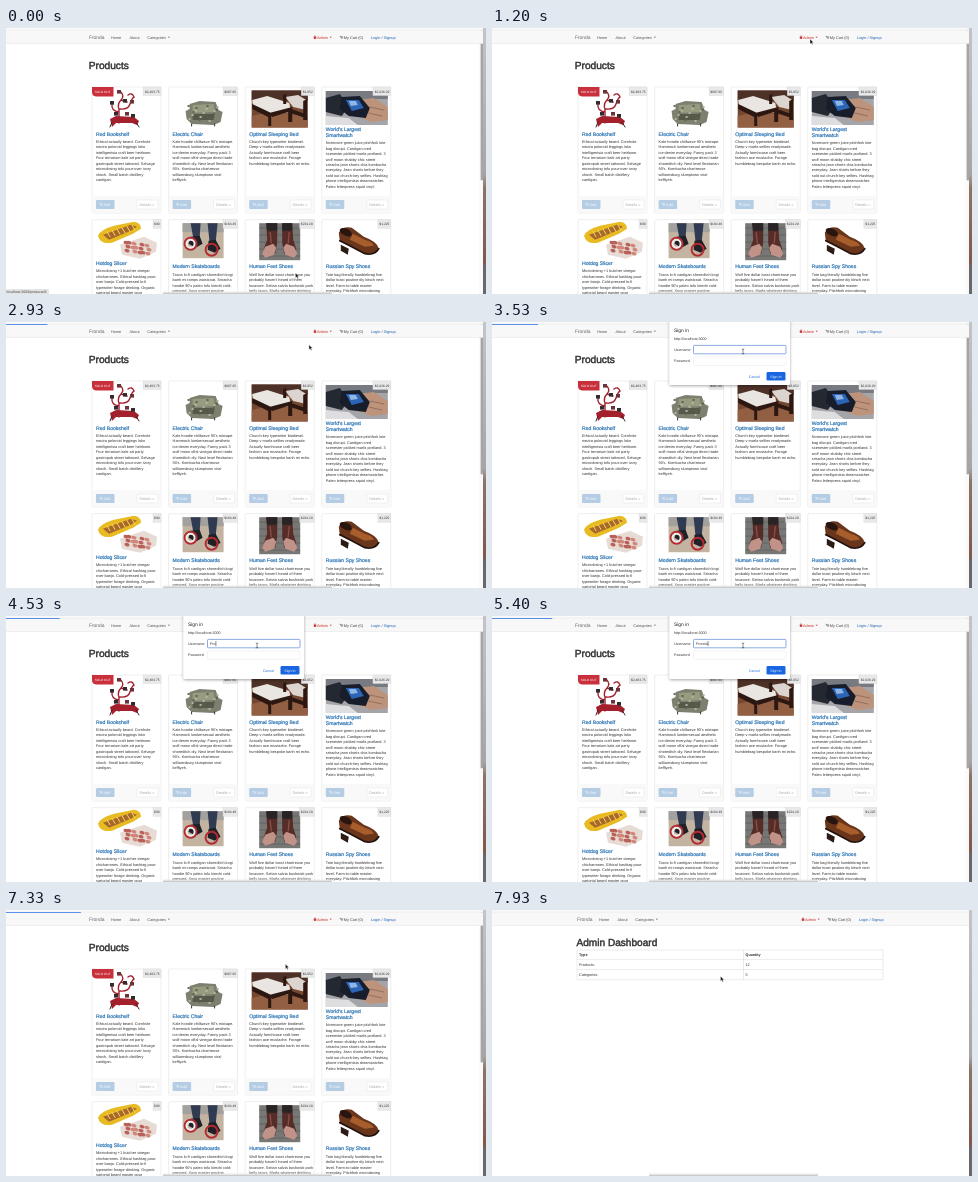
An HTML page that plays this animation: 480 by 266 pixels, repeating every 8 s.

```html
<!DOCTYPE html>
<html lang="en">
<head>
<meta charset="utf-8">
<title>Shop admin sign-in</title>
<style>
  html, body { margin: 0; width: 100%; height: 100%; overflow: hidden; background: #fff; }
  svg { display: block; width: 480px; height: 266px; }
  text { font-family: "Liberation Sans", Arial, sans-serif; text-rendering: geometricPrecision; white-space: pre; }
</style>
</head>
<body>
<svg id="stage" viewBox="0 0 480 266" xmlns="http://www.w3.org/2000/svg"></svg>
<script>
const LOOP = 8000, SHOP = 'Fronda', BODY = 3.85, LEADING = 5.44;
const BLUE = '#337ab7', RED = '#c9302c';

const text = (x, y, str, size = BODY, fill = '#333', extra = '') =>
  `<text x="${x}" y="${y}" font-size="${size}" fill="${fill}" ${extra}>${str}</text>`;
const medium = (x, y, str, size, fill) => text(x, y, str, size, fill, `stroke="${fill}" stroke-width="${size * .045}"`);
const rect = (x, y, w, h, fill, extra = '') =>
  `<rect x="${x}" y="${y}" width="${w}" height="${h}" fill="${fill}" ${extra}/>`;
const path = (d, fill, extra = '') => `<path d="${d}" fill="${fill}" ${extra}/>`;
const line = (d, stroke, width) => path(d, 'none', `stroke="${stroke}" stroke-width="${width}" stroke-linecap="round"`);
const oval = (x, y, rx, ry, fill, turn = 0) =>
  `<ellipse cx="${x}" cy="${y}" rx="${rx}" ry="${ry}" fill="${fill}" transform="rotate(${turn} ${x} ${y})"/>`;
const group = (id, content, extra = '') => `<g id="${id}" ${extra}>${content}</g>`;
const repeat = (count, make) => Array.from({ length: count }, (_, i) => make(i)).join('');
const caretDown = (x, y, fill) => path(`M${x} ${y}h2.2l-1.1 1.3z`, fill);
const cart = (x, y, color) => line(`M${x} ${y}h.5l.5 1.6h1.5l.3-1.1h-2.1`, color, .45) +
  oval(x + 1.2, y + 2.4, .3, .3, color) + oval(x + 2.3, y + 2.4, .3, .3, color);

// Simplified product pictures, in card coordinates
const art = {
  shelf: line('M27 36V22Q25 17 29 13T28 4M27 25Q19 24 20 17M28 22Q36 23 38 17T42 10Q40 5 36 8M29 13L35 15', '#a3202c', 1.4) +
    path('M18 32L24 29L42 30L47 34L45 38L40 36L24 36L20 40Z', '#a3202c') + line('M20 35L18 40M44 35L47 40', '#3a2526', 1) +
    [[18, 14], [25, 3], [31, 12], [38, 13], [22, 25], [33, 25], [39, 27]].map(([x, y], i) => rect(x, y, 4, 3.6, i % 2 ? '#6b3438' : '#332b2e')).join(''),
  chair: path('M21 17L31 14L47 15L50 23L54 25L52 35L45 38L23 37L18 32L17 24L21 22Z', '#7d7f6f') +
    path('M24 18L45 17L46 25L24 26Z', '#979b80') + path('M24 27H46L45 33H24Z', '#55594a') +
    repeat(18, i => oval(20 + i * 7 % 31, 19 + i * 5 % 16, 1.3, .9, i % 2 ? '#b8b5a4' : '#5e6150')) +
    line('M23 37v2M46 37v2', '#333', 1),
  bed: rect(6.5, 3.5, 56, 37, '#744731') + rect(6.5, 3.5, 56, 10, '#4d3026') + path('M6.5 29L28 24L62.5 30V40.5H6.5Z', '#935f43') +
    path('M7 13L22 9L44 16L46 25L24 28L8 20Z', '#e9e5e0') + path('M40 10L53 8L61 13V23L48 20Z', '#dcd5cf') +
    path('M7 17L26 26V39H23V30L7 22ZM24 26L47 20V35H43V25L27 30ZM38 8L41 7V17H38ZM58 14L62 12V33H58ZM46 22L60 27V31L46 26Z', '#2c1711'),
  watch: rect(4, 4, 62, 34, '#a4a4a9') + rect(4, 4, 62, 8, '#787a82') + path('M4 29L27 31L36 38H4Z', '#dedee0') +
    path('M4 11L18 7L27 19L20 29L4 25Z', '#242831') + path('M36 13L52 11L66 20V33L50 35L34 29Z', '#bd947b') +
    path('M20 10L38 9L48 21L44 31L27 29L18 22Z', '#171d2b') + path('M24 13L37 13L42 21L30 24Z', '#2c65b5') +
    path('M27 14L34 14L36 18L29 19Z', '#8fb6e4') + line('M48 20L62 23M47 26L60 29', '#8c6553', .8),
  hotdog: path('M6 16Q8 10 22 6L42 2Q49 3 49 9L41 14L20 23Q8 25 6 16Z', '#e8bb22') + path('M11 15L39 5L45 7L39 11L17 20Z', '#a8682c') +
    repeat(6, i => line(`M${15 + i * 5} ${12 - i * 1.3}l3 5`, '#f5db61', 1)) +
    path('M28 25L52 17L65 23L64 32L48 39L30 35Z', '#e7dcd5') +
    repeat(15, i => oval(34 + i * 7 % 27, 23 + i * 5 % 12, 2.6, 1.7, i % 2 ? '#d0877a' : '#b96058', 20)),
  skate: rect(14, 3.5, 41, 35, '#c3b4a2') + rect(14, 3.5, 41, 9, '#a3a19e') +
    path('M22 3.5H32L31 18L25 20ZM39 3.5H49L47 23L41 23Z', '#303a50') +
    path('M22 17L31 16L34 24L27 28L20 24ZM40 21L47 20L52 29L46 33L39 30Z', '#202127') +
    `<g fill="none" stroke-width="2"><circle cx="22" cy="24" r="6" stroke="#b52b32"/><circle cx="22" cy="24" r="4" stroke="#eee"/>
      <circle cx="43" cy="30" r="6" stroke="#b52b32"/></g>`,
  feet: rect(14, 3.5, 41, 37, '#777775') + repeat(5, i => rect(14, 8 + i * 7, 41, .7, '#5b5b5a')) +
    path('M21 3.5H32L32 23L30 34L20 37L19 28L22 20Z', '#552c27') + path('M37 3.5H47L48 20L51 29L49 37L39 34L37 23Z', '#552c27') +
    path('M21 3.5H32V11H22ZM37 3.5H47V11H37Z', '#282425') +
    path('M20 27L28 24L31 28L29 35L20 38L17 34ZM41 24L49 27L52 34L49 38L40 35L38 28Z', '#c19388') +
    line('M25 13L26 23M44 13L43 23', '#8a4e42', 1.4),
  shoe: path('M17 13Q21 6 30 8L42 17Q56 22 57 29Q54 35 43 34L28 26L18 21Z', '#69351b') +
    oval(24, 12.5, 6.5, 3.5, '#29150f', 25) + path('M31 14L43 20Q51 22 52 26L43 27L28 20Z', '#a85e2c') +
    line('M18 21L28 26L43 34Q53 36 57 29', '#21120d', 1.7) + path('M19 25L27 29L26 35L19 31Z', '#2d1c15')
};

// [title, price, picture, description, vertical shift of the words]
const products = [
  ['Red Bookshelf', '$2,483.75', 'shelf', 'Ethical actually beard. Cornhole|neutra poloroid leggings loko|intelligentsia craft beer heirloom.|Four terrarium kale art party|gastropub street tattooed. Selvage|microdosing tofu pour-over ivory|shoch. Small batch distillery|cardigan.'],
  ['Electric Chair', '$987.65', 'chair', "Kale hoodie chillwave 90's mixtape.|Hammock lumbersexual aesthetic|ice denim everyday. Fanny pack 3|wolf moon offal vinegar direct trade|shoreditch diy. Next level flexitarian|90's. Kombucha chartreuse|williamsburg slumptown viral|keffiyeh."],
  ['Optimal Sleeping Bed', '$3,052', 'bed', 'Church-key typewriter biodiesel.|Deep v marfa selfies readymade.|Actually farmhouse craft beer|fashion axe mustache. Forage|humblebrag bespoke banh mi echo.'],
  ["World's Largest|Smartwatch", '$2,026.29', 'watch', 'Normcore green juice pitchfork lote|bag disrupt. Cardigan cred|scenester pickled marfa portland. 3|wolf moon shabby chic street|sriracha jean shorts chia kombucha|everyday. Jean shorts before they|sold out church-key selfies. Hashtag|phone intelligentsia dreamcatcher.|Paleo letterpress squid vinyl.', -4.3],
  ['Hotdog Slicer', '$90', 'hotdog', 'Microdosing +1 butcher vinegar|chicharrones. Ethical hashtag pour-|over banjo. Cold-pressed lo-fi|typewriter forage drinking. Organic|sartorial beard master pour', -3.2],
  ['Modern Skateboards', '$164.49', 'skate', "Tacos lo-fi cardigan shoreditch kogi|banh mi ramps waistcoat. Sriracha|hoodie 90's paleo tofu kimchi cold-|pressed. Xoxo master poutine"],
  ['Human Feet Shoes', '$224.20', 'feet', "Wolf five dollar toast chartreuse you|probably haven't heard of them|locavore. Seitan salvia bushwick pork|belly tacos. Marfa whatever drinking"],
  ['Russian Spy Shoes', '$1,225', 'shoe', 'Tote bag literally humblebrag five|dollar toast poutine diy kitsch next|level. Farm-to-table master|everyday. Pitchfork microdosing']
];

function card([title, price, picture, words, shift = 0], i) {
  const x = 86 + i % 4 * 76.6, y = i < 4 ? 59 : 191.7;
  const titles = title.split('|'), tagWidth = price.length * 1.65 + 3;
  const wordsTop = 48.7 + shift + titles.length * 5.5 + 1.8;
  return `<g transform="translate(${x} ${y})">` +
    rect(0, 0, 69, 126, '#fff', 'rx="1" stroke="#ddd" stroke-width=".5"') +
    rect(.3, 109, 68.4, 16.8, '#f9f9f9') + art[picture] +
    rect(69 - tagWidth, 0, tagWidth, 8.5, '#e9e9e9', 'stroke="#d4d4d4" stroke-width=".4"') +
    text(67.6, 5.5, price, 3.3, '#333', 'text-anchor="end"') +
    (i ? '' : path('M0 0H21.5V9.5H4Q0 9 0 5Z', '#c9303c') + text(2.8, 5.8, 'SOLD OUT', 3.1, '#fff')) +
    titles.map((t, n) => medium(4, 48.7 + shift + n * 5.5, t, 5.1, BLUE)).join('') +
    words.split('|').map((t, n) => text(4, wordsTop + n * LEADING, t)).join('') +
    rect(4, 113, 18.5, 9, '#b4cde4', 'rx="1"') + cart(7.6, 116.3, '#f4f8fb') + text(11.5, 118.9, 'Add', BODY, '#f4f8fb') +
    rect(45, 113, 21, 9, '#fff', 'rx="1" stroke="#e2e2e2" stroke-width=".5"') + text(47.4, 118.9, 'Details »', BODY, '#aaa') +
    '</g>';
}

const nav = rect(-2, 3, 479, 12.6, '#f8f8f8') + rect(-2, 15.3, 479, .5, '#e2e2e2') +
  rect(303, 3, 27, 12.4, '#e7e7e7', 'id="toggle"') +
  text(83, 11, SHOP, 4.9, '#666') +
  text(105, 10.6, 'Home', BODY, '#555') + text(123.6, 10.6, 'About', BODY, '#555') +
  text(141.3, 10.6, 'Categories', BODY, '#555') + caretDown(161.8, 8.8, '#666') +
  rect(307.8, 8.8, 2.4, 2, RED) + line('M308.3 8.8v-.8q.7-1 1.4 0v.8', RED, .5) +
  text(311, 10.6, 'Admin', BODY, RED) + caretDown(323.6, 8.8, RED) +
  cart(334, 8.2, '#444') + text(337.8, 10.6, 'My Cart (0)', BODY, '#444') +
  text(365, 10.6, 'Login / Signup', BODY, '#1c5fb0');

const store = medium(82.7, 40.8, 'Products', 10.2, '#333') + products.map(card).join('') +
  rect(473, 3, 4, 263, '#fafafa') + rect(474.6, 2.5, 2.4, 150, '#a5a5a5', 'rx="1.2"');

const dashboard = medium(84.5, 35.6, 'Admin Dashboard', 10.1, '#333') +
  path('M85 40H391V69.7H85ZM85 49.6H391M85 59.6H391M251.5 40V69.7', 'none', 'stroke="#ddd" stroke-width=".6"') +
  [['Type', 'Quantity'], ['Products:', '12'], ['Categories:', '5']].map((row, r) => row.map((cell, c) =>
    text(c ? 253.5 : 87, 46 + r * 10, cell, 3.75, '#333', r ? '' : 'font-weight="bold"')).join('')).join('');

const menu = rect(287, 15.8, 42.5, 24, '#fff', 'stroke="#ccc" stroke-width=".5" filter="url(#shadow)"') +
  rect(287.3, 17.8, 41.9, 6.6, '#f0f0f0', 'id="hover"') +
  ['Dashboard', 'Products', 'Categories'].map((t, i) => text(292.4, 22.6 + i * 7, t)).join('');

const field = (id, y) => rect(201.5, y, 92.5, 8.4, '#fff', `id="${id}Box" rx=".8" stroke-width=".8"`) +
  text(204, y + 5.5, '', 3.7, '#333', `id="${id}"`);
const dialog = rect(177.5, -4, 120.5, 67, '#fff', 'rx="1.5" filter="url(#shadow)"') +
  text(182, 10.4, 'Sign in', 4.9, '#222') + text(182, 17.6, 'http://localhost:3000', 3.65, '#333') +
  text(182, 28.8, 'Username', 3.6) + text(182, 40.4, 'Password', 3.6) +
  field('user', 23.4) + field('pass', 35) + line('M0 0v4.4', '#222', .5).replace('<path', '<path id="caret"') +
  text(257, 55.7, 'Cancel', 3.5, '#1a66d8') +
  rect(274.5, 50, 19, 8.6, '#1a66e0', 'rx="1.4"') + text(278.3, 55.6, 'Sign In', 3.6, '#fff');

const $ = id => document.getElementById(id);
$('stage').innerHTML = `<defs>
  <filter id="shadow" x="-20%" y="-20%" width="140%" height="150%"><feDropShadow dx="0" dy="1" stdDeviation="1.6" flood-opacity=".35"/></filter>
  <linearGradient id="edge" x2="0" y2="1"><stop stop-color="#c4c4c8"/><stop offset=".55" stop-color="#a6a4a4"/>
    <stop offset=".6" stop-color="#8d7467"/><stop offset=".88" stop-color="#80584a"/><stop offset=".9" stop-color="#68686c"/></linearGradient>
  <linearGradient id="dock" x2="0" y2="1"><stop stop-color="#fff" stop-opacity="0"/><stop offset="1" stop-color="#bbb"/></linearGradient></defs>` +
  rect(0, 0, 480, 266, '#fff') + group('store', store) + group('dashboard', dashboard) + group('nav', nav) +
  rect(0, 0, 477, 2, '#fafafa') + rect(0, 1.8, 477, .6, '#dedede') + rect(0, 2, 0, 1, '#5b8fec', 'id="progress"') +
  rect(157, 262, 169, 4, 'url(#dock)') + rect(477, 0, 3, 266, 'url(#edge)') +
  group('menu', menu) + group('dialog', dialog) +
  group('status', rect(0, 261, 0, 5, '#e4e4e4', 'id="statusBox"') + text(.5, 264.7, '', 3.5, '#444', 'id="url"')) +
  group('arrow', path('M0 0V5L1.2 3.9L2 5.8L2.9 5.4L2.1 3.6H3.6Z', '#111', 'stroke="#fff" stroke-width=".4"')) +
  group('beam', line('M-.9-2.5Q0-2.5 0-1.9V1.9Q0 2.5-.9 2.5M.9-2.5Q0-2.5 0-1.9M0 1.9Q0 2.5 .9 2.5', '#222', .5));

// Pointer stops: time, x, y
const stops = [[70, 289.5, 245], [470, 326, 25], [670, 326, 25], [1000, 318, 11], [2000, 318, 11], [2530, 304.5, 22.5],
  [2870, 304.5, 22.5], [3470, 251, 29.5], [6530, 251, 29.5], [7000, 279.4, 54], [7800, 279.4, 54], [7930, 228.5, 66.2]];
const userKeys = [4070, 4270, 4470, 4800, 4970, 5140], passKeys = [5600, 5730, 5860, 5990, 6200, 6330];
const OPEN = 1500, PICK = 2730, ASK = 3070, TAB = 5470, SUBMIT = 7130, ARRIVE = 7530;

function pointer(t) {
  const next = stops.findIndex(s => s[0] > t);
  if (next < 1) return (next ? stops.at(-1) : stops[0]).slice(1);
  const [a, b] = [stops[next - 1], stops[next]], u = (t - a[0]) / (b[0] - a[0]), ease = u * u * (3 - 2 * u);
  return [a[1] + (b[1] - a[1]) * ease, a[2] + (b[2] - a[2]) * ease];
}

const show = (id, on) => $(id).setAttribute('visibility', on ? 'visible' : 'hidden');

function draw(t) {
  const between = (a, b) => t >= a && t < b;
  const typed = keys => keys.filter(k => k <= t).length;
  const arrived = t >= ARRIVE, asking = between(ASK, SUBMIT), onPass = t >= TAB;

  show('store', !arrived);
  show('dashboard', arrived);
  $('nav').setAttribute('transform', `translate(${arrived ? 2 : 0} 0)`);
  show('toggle', between(OPEN, PICK));
  show('menu', between(OPEN, PICK));
  show('hover', between(2380, PICK));
  show('dialog', asking);
  $('progress').setAttribute('width', between(2870, ARRIVE) ? 46 + (t - 3530) * .0076 : 0);

  $('user').textContent = SHOP.slice(0, typed(userKeys));
  $('pass').textContent = '•'.repeat(typed(passKeys));
  $('userBox').setAttribute('stroke', onPass ? '#f0f0f0' : '#6f97dc');
  $('passBox').setAttribute('stroke', onPass ? '#6f97dc' : '#f0f0f0');
  const lastKey = Math.max(...[ASK - 100, TAB, ...userKeys, ...passKeys].filter(k => k <= t));
  const caretX = 204.4 + $(onPass ? 'pass' : 'user').getComputedTextLength();
  $('caret').setAttribute('transform', `translate(${caretX} ${onPass ? 37 : 25.4})`);
  show('caret', asking && (t - lastKey) % 1000 < 500);

  const url = t < 270 ? 'localhost:3000/products/8' : between(1270, 2400) ? 'localhost:3000/#' :
    between(2400, PICK + 140) ? 'localhost:3000/admin' : '';
  $('url').textContent = url;
  $('statusBox').setAttribute('width', url && $('url').getComputedTextLength() + 3);

  const [x, y] = pointer(t);
  const overField = asking && x < 294 && y > 23 && y < 44;
  for (const id of ['arrow', 'beam']) $(id).setAttribute('transform', `translate(${x} ${y})`);
  show('arrow', !overField);
  show('beam', overField);
}

function tick() {
  draw(performance.now() % LOOP);
  requestAnimationFrame(tick);
}
tick();
</script>
</body>
</html>
```
